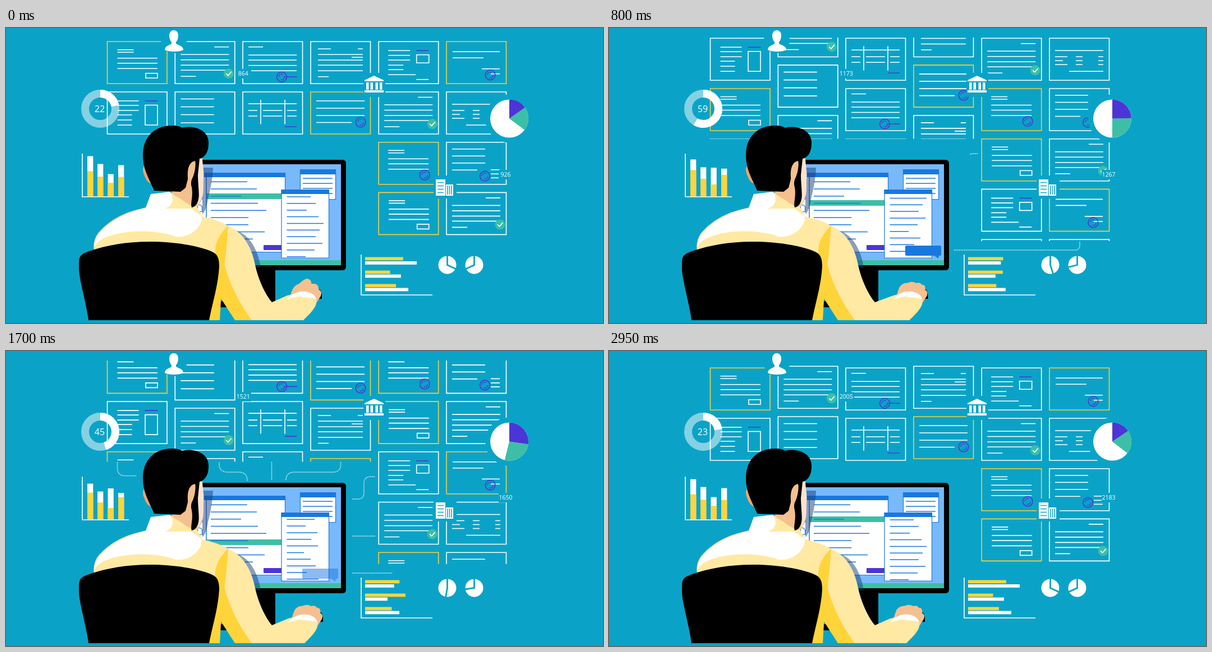
An HTML page that plays this animation: 1064x526 px, repeating every 3000 ms.

```html
<!DOCTYPE html>
<html lang="en">
<head>
<meta charset="utf-8">
<title>Document processing</title>
<style>
  html, body { margin: 0; width: 100%; height: 100%; overflow: hidden; background: #0aa3c7; }
  svg { display: block; width: 100vw; height: 100vh; }
  text { font-family: "Open Sans", "Noto Sans", sans-serif; fill: #fff; text-anchor: middle; }
  .bg { fill: #0aa3c7; }
  .w { fill: #fff; }
  .y { fill: #ffd43b; }
  .card { fill: none; stroke: #fff; stroke-width: 1.6; }
  .gold { stroke: #f5cf3f; }
  .violet { stroke: #4c35d6; }
  .axis { fill: none; stroke: #fff; stroke-width: 1.6; }
  .route { fill: none; stroke: #fff; stroke-width: 1.5; }
  .blue { fill: #1878e0; }
  .ink { fill: none; stroke: #1878e0; stroke-width: 1.5; }
  .pane { fill: #fff; stroke: #1878e0; stroke-width: 1.2; }
  .teal { fill: #3cbfa6; }
  .skin { fill: #f5c08f; }
  .pale { fill: #ffe9a3; }
  .shade { fill: #173f7a; opacity: .5; }
</style>
</head>
<body>
<svg viewBox="0 0 1064 526">
  <defs>
    <clipPath id="clipShort"><rect x="170" y="17" width="490" height="180.5"/></clipPath>
    <clipPath id="clipTall"><rect x="655" y="17" width="250" height="363"/></clipPath>
    <clipPath id="clipList"><rect x="491" y="296" width="85" height="113"/></clipPath>
  </defs>

  <g id="cards"></g>

  <!-- icons and counters over the cards -->
  <circle class="bg" cx="299" cy="22" r="23"/>
  <path class="w" d="M299 4c5 0 8 4 8 9 0 6-2 10-4 12v3c5 3 13 4 13 11-6 4-27 4-33 0 0-7 8-8 12-11v-3c-2-2-4-6-4-12 0-5 3-9 8-9z"/>
  <g>
    <rect class="bg" x="637" y="80" width="39" height="43"/>
    <path class="w" d="M639 95v-2l17-8 17 8v2zM642 97h4.500v13h-4.500zM649.500 97h4.500v13h-4.500zM658.500 97h4.500v13h-4.500zM666 97h4.500v13h-4.500zM639 111h34v4h-34z"/>
  </g>
  <g>
    <rect class="bg" x="762" y="263" width="41" height="41"/>
    <path class="w" d="M766 270h17v29h-17zM784 279h13v20h-13z"/>
    <path d="M769 275.500h11M769 281.500h11M769 287.500h11M769 293.500h11M787 281v16M790.500 281v16M794 281v16" stroke="#0aa3c7" stroke-width="1.500"/>
  </g>
  <rect class="bg" x="410" y="73" width="27" height="17"/>
  <text id="countA" x="422.800" y="85" font-size="10.600"></text>
  <rect class="bg" x="878" y="253" width="25" height="17"/>
  <text id="countB" x="890.500" y="265" font-size="10.600"></text>

  <!-- charts -->
  <circle cx="168" cy="144" r="27" fill="none" stroke="#fff" stroke-opacity=".5" stroke-width="14"/>
  <circle id="ring" cx="168" cy="144" r="27" fill="none" stroke="#fff" stroke-width="14" pathLength="100" transform="rotate(-90 168 144)"/>
  <text id="percent" x="167" y="150" font-size="16"></text>
  <circle class="bg" cx="897" cy="161.500" r="43"/>
  <circle class="w" cx="897" cy="161.500" r="34"/>
  <path id="pieTeal" class="teal"/>
  <path id="pieViolet" fill="#4c35d6"/>
  <path class="axis" d="M136 224V301H219M633 404V476H760"/>
  <g id="bars"></g>
  <circle class="w" cx="786.500" cy="422.500" r="16"/>
  <circle class="w" cx="834.500" cy="422.500" r="16"/>
  <path id="cuts" fill="none" stroke="#0aa3c7" stroke-width="2.800"/>
  <g id="routes"></g>

  <!-- monitor -->
  <path d="M440 425h40v62h28v11H378v-11h62z"/>
  <rect x="300" y="235" width="306" height="197" rx="6"/>
  <path fill="#78b9fb" d="M310 243H597V423H310z"/>
  <path class="teal" d="M310 414H597V423H310z"/>
  <path class="pane" d="M524.500 252.500H587.500V305.500H524.500z"/>
  <path class="blue" d="M524 252H588V261H524z"/>
  <path class="ink" d="M529 268H582M529 277H582M529 286H582M529 295H582"/>
  <path class="pane" d="M336 259H497.500V399.500H336z"/>
  <path class="blue" d="M336 258H498V266H336z"/>
  <rect id="highlight" class="teal" x="357" width="141" height="10"/>
  <path class="ink" d="M357 266V399" stroke-width="1.200"/>
  <path id="textLines" class="ink"/>
  <rect x="459" y="387" width="40" height="9" rx="1" fill="#4c35d6"/>
  <path class="pane" d="M341.500 273h5l3 3v9h-8zM341.500 293h5l3 3v9h-8zM341.500 315.500h5l3 3v9h-8z"/>
  <path class="pane" d="M491 289H575.500V410H491z"/>
  <g clip-path="url(#clipList)"><path id="list" class="ink"/></g>
  <path class="blue" d="M490.500 288H576V296H490.500z"/>
  <path id="bubble" class="blue" d="M530 388H590q2 0 2 2V404q0 2-2 2H588L587 411 580 406H530q-2 0-2-2V390q0-2 2-2z"/>
  <path class="shade" d="M350 249H369C368 268 365 285 360 305 358 318 356 326 350 332z"/>
  <path class="shade" d="M400 359C430 362 448 390 454 427H441C430 395 420 380 400 359z"/>

  <!-- man -->
  <path id="mouse"/>
  <path id="handUp" class="skin" d="M505 480C510 470 510 463 518 458 526 455 528 449 536 447 542 447 545 452 544 456 549 456 553 455 556 460 557 463 557 465 558 467 562 468 563 473 561 478L554 489 530 492z"/>
  <path id="handFlat" class="skin" d="M505 480C511 470 510 462 516 458 522 453 527 456 531 453 537 452 540 454 542 455 547 453 551 455 552 458 557 457 559 462 558 467 562 469 563 473 561 478L554 489 530 492z"/>
  <path class="y" d="M340 340 396 353 420 440 440 521H408L381 479 381 521H358z"/>
  <path id="arm" class="pale"/>
  <path id="cuff" class="w"/>
  <path class="pale" d="M158 400C154 388 158 374 164 366 190 335 225 325 250 320L293 293 330 303 350 336C372 341 388 347 396 353 375 372 366 395 379 428L360 470H180z"/>
  <path class="y" d="M396 353C376 371 365 398 379 430L362 521H381L384 470 392 400z"/>
  <path class="w" d="M157 391C156 374 180 338 248 321L283 322 326 319C342 322 350 330 349 340 346 359 325 375 302 372 275 361 215 357 176 374 167 378 161 384 157 391z"/>
  <path class="skin" d="M290 280 330 240 346 231C351 245 352 260 352 272 352 285 351 300 348 308L339 322 300 300z"/>
  <path fill="#fbe3cf" d="M343 234 350 232C350 245 354 258 352 270 351 285 353 295 349 303L341 317 344 300C341 285 341 262 343 234z"/>
  <path class="pale" d="M291 293 296 297C305 300 318 308 327 318L340 318 350 336 330 322 280 322z"/>
  <path class="w" d="M258 296 292 292C301 305 297 318 283 322L248 323z"/>
  <path fill="#efa36b" d="M250 245C242 245 243 256 247 264 250 272 255 279 263 277z"/>
  <path d="M264 290C256 270 243 252 244 224 245 193 266 173 298 174 305 174 311 176 314 178 334 173 362 181 361 206 361 222 354 231 345 233L342 262C342 278 345 296 343 305 341 314 337 319 331 320 328 313 334 300 331 284L326 262 320 285 311 292z"/>
  <path class="skin" d="M337 237C329 238 325 246 324 256 323 266 326 280 324 290L311 292 326 305 331 303C332 292 328 280 331 270 336 262 339 244 337 237z"/>
  <path d="M130 420C130 406 134 403 148 398 180 387 215 381 258 381 300 381 340 388 363 397 376 402 380 408 380 425 378 460 368 490 362 521H147C143 490 132 455 130 432z"/>
</svg>

<script>
const LOOP = 3000, PITCH = 89.7;
const $ = id => document.getElementById(id);
const set = (id, attrs) => { for (const k in attrs) $(id).setAttribute(k, attrs[k]); };
const clamp = x => Math.max(0, Math.min(1, x));
const span = (t, a, b) => clamp((t - a) / (b - a));

// ---- cards ----
const rows = (x1, x2, ...ys) => ys.map(y => `M${x1} ${y}H${x2}`).join('');
const ink = (d, cls = '') => `<path class="card ${cls}" d="${d}"/>`;
const frame = (cls, body) => ink('M0 0H106.500V75H0z', cls) + body;
const seal = (x, y) => `<g class="card violet"><circle cx="${x}" cy="${y}" r="8.800"/>
  <circle cx="${x}" cy="${y}" r="5.200" stroke-width="1.300" stroke-dasharray="10 6.300"/></g>`;

const button = frame('gold', ink(rows(18, 47, 14.5, 19) + rows(18, 89.5, 29.5, 38.5, 48) + 'M68.500 56.500H89.500V65H68.500z'));
const tallBox = frame('', ink(rows(18, 56, 16, 24, 33) + rows(18, 44, 41, 50, 59) + 'M67.500 23.500H89.500V59H67.500z')
  + ink(rows(67, 90, 16), 'violet'));
const checked = frame('', ink(rows(70, 96, 9.5) + rows(10, 96, 23, 32.5, 42, 51) + rows(10, 37, 62))
  + '<circle class="teal" cx="95.500" cy="57" r="9"/>' + ink('M91 57 94.500 60.500 100.500 53.500'));
const plain = frame('', ink(rows(10, 69.5, 12.5, 26.5, 40.5, 55)));
const signed = frame('', ink(rows(10, 36, 9.5) + rows(10, 96, 24, 33, 42.5, 52)) + seal(69.5, 63) + ink(rows(73, 97, 63), 'violet'));
const table = frame('', ink('M32 14V57.500M75 14V57.500' + rows(10, 96, 21) + [33, 43].map(y => rows(10, 26, y) + rows(36, 70, y) + rows(79, 96, y)).join(''))
  + ink(rows(75, 96, 62), 'violet'));
const letter = frame('', ink(rows(13, 36, 13) + rows(84, 93, 13) + rows(73, 93, 28) + rows(13, 93, 23, 33, 42, 52) + rows(13, 32, 62.5)));
const goldSeal = frame('gold', ink(rows(10, 96, 16, 29, 42) + rows(10, 73, 54.5)) + seal(89, 54));
const smallBox = frame('', ink(rows(17, 56, 16, 24.5, 33) + rows(17, 44, 42, 50) + rows(17, 66, 59) + rows(67, 89, 67.5) + 'M67.500 23.500H89.500V38H67.500z')
  + ink(rows(67, 89, 16), 'violet'));
const stamped = frame('gold', ink(rows(17, 46, 14.5, 19) + rows(17, 89, 29.5, 38.5, 48)) + seal(82, 58.5));
const sparse = frame('gold', ink(rows(11, 95, 18) + rows(11, 66, 29) + rows(63, 95, 48.5) + rows(79, 95, 57.5)) + seal(78, 59.5));
const columns3 = frame('', ink(rows(10, 96, 22) + [33, 40, 47].map(y => rows(10, y === 40 ? 24 : 32, y) + rows(47, 59, y) + rows(87, 96, y)).join('') + rows(35, 96, 59)));
const whiteSeal = frame('', ink(rows(10, 69, 12, 24.5, 37) + rows(10, 55, 49.5) + rows(79, 95, 49, 56.5, 63.5)) + seal(68.5, 60.5));

const columns = [
  { x: 180.5, steps: 4, deck: [button, tallBox] },
  { x: 301.3, steps: 2, deck: [checked, plain] },
  { x: 422, steps: 4, deck: [signed, table] },
  { x: 543, steps: 2, deck: [letter, goldSeal] },
  { x: 664.2, steps: 4, deck: [smallBox, checked, stamped, button], tall: true },
  { x: 785, steps: 4, deck: [sparse, columns3, whiteSeal, checked], tall: true },
];
$('cards').innerHTML = columns.map(({ x, deck, tall }, c) => {
  const stack = Array.from({ length: 9 }, (_, i) =>
    `<g transform="translate(${x} ${24.3 + i * PITCH})">${deck[i % deck.length]}</g>`).join('');
  return `<g clip-path="url(#clip${tall ? 'Tall' : 'Short'})"><g id="col${c}">${stack}</g></g>`;
}).join('');

// ---- dotted routes: path, then start and end of drawing and of erasing ----
const routes = [
  ['M839 381V387Q839 396 830 396H615', 250, 550, 1500, 1790],
  ['M657 224H650Q638 224 638 236V252Q638 264 627 264H615', 750, 1000, 1800, 2050],
  ['M617 330H659', 850, 1050, 1800, 2000],
  ['M198.500 198V208Q198.500 222.500 212 222.500H233', 800, 1050, 1800, 2050],
  ['M430 231Q430 216 414 216H396Q380 216 380 202V197', 900, 1190, 1800, 2130],
  ['M473.500 198V232', 1300, 1500, 2150, 2350],
  ['M596.500 198V203Q596.500 216 582 216H514Q499 216 499 231', 1300, 1600, 2150, 2450],
].map(([d, ...times]) => {
  const path = document.createElementNS('http://www.w3.org/2000/svg', 'path');
  path.setAttribute('class', 'route');
  path.setAttribute('d', d);
  $('routes').append(path);
  return { path, times, length: path.getTotalLength() };
});

// ---- chart bars: position, resting size, size at the peak ----
const uprights = [
  [145, 72, 64, 45, 48], [163, 58, 50, 35.5, 30.5], [181.5, 40, 55.5, 24.5, 20.5], [200, 56, 47.5, 35, 40],
];
const levels = [
  [408.5, 68, 60, 'y', 'early'], [416, 92, 44, 'w', 'early'], [432.5, 44.5, 72, 'y', 'late'],
  [439.5, 64, 40, 'w', 'late'], [456.5, 55, 47.5, 'y', 'late'], [463.5, 77, 61, 'w', 'late'],
];
const mix = (a, b, k) => a + (b - a) * k;
const rect = (cls, x, y, w, h) => `<rect class="${cls}" x="${x}" y="${y}" width="${w}" height="${h}"/>`;

// ---- eased tracks through shared key times ----
const TIMES = [0, 500, 1150, 1700, 2100, 2500, 2950, 3000];
function track(values, smooth = true) {
  const slope = i => {
    const a = Math.max(0, i - 1), b = Math.min(TIMES.length - 1, i + 1);
    return (values[b] - values[a]) / (TIMES[b] - TIMES[a]);
  };
  return t => {
    let i = 0;
    while (i < TIMES.length - 2 && t >= TIMES[i + 1]) i++;
    const d = TIMES[i + 1] - TIMES[i], u = (t - TIMES[i]) / d, a = values[i], b = values[i + 1];
    if (!smooth) return mix(a, b, u);
    const v = 1 - u;
    return a * (1 + 2 * u) * v * v + b * u * u * (3 - 2 * u) + d * u * v * (slope(i) * v - slope(i + 1) * u);
  };
}
const tracks = {
  donut: track([22, 49, 63, 45, 34, 28, 22.7, 22]),
  upright: track([0, .49, .95, 1, .77, .46, 0, 0]),
  early: track([0, .42, .95, .84, .57, .3, 0, 0]),
  late: track([0, .38, .88, 1, .68, .36, 0, 0]),
  violet: track([55, 76, 100, 98, 86.6, 71.5, 56, 55]),
  teal: track([126.5, 161, 197, 194, 180, 156, 127.5, 126.5]),
  highlight: track([295, 282, 336, 336, 328.5, 320.5, 295, 295], false),
  hand: track([0, 4.5, 6.5, 2, 0, 0, 0, 0], false),
};

const polar = (cx, cy, r, deg) => {
  const a = deg * Math.PI / 180;
  return `${cx + r * Math.sin(a)} ${cy - r * Math.cos(a)}`;
};
const slice = (from, to) =>
  `M897 161.500L${polar(897, 161.5, 34, from)}A34 34 0 ${to - from > 180 ? 1 : 0} 1 ${polar(897, 161.5, 34, to)}z`;
const cut = (cx, deg) => `M${cx} 405V422.500L${polar(cx, 422.5, 18, deg)}`;

set('textLines', { d: [430, 447, 419, 449, 464, 432, 432, 461, 440].map((x, i) => rows(365, x, 274.3 + i * 12.75)).join('') });
const lengths = [42, 51, 35, 56, 65, 58, 51, 63, 49, 33, 54, 43, 55, 30];
set('list', { d: Array.from({ length: 25 }, (_, i) => rows(500.5, 501 + lengths[i % 14], 301 + i * 11.85)).join('') });

function drawMan(t) {
  const s = tracks.hand(t), up = t < 200 || (t >= 1000 && t < 1350) || (t >= 1900 && t < 2300);
  const move = { transform: `translate(${s} 0)` };
  set('handUp', { ...move, display: up ? 'inline' : 'none' });
  set('handFlat', { ...move, display: up ? 'none' : 'inline' });
  set('mouse', { ...move, d: 'M545 466Q556 462 561 468L563 475V483H545z' });
  set('cuff', { ...move, d: 'M505 480C512 471 530 467 542 472 549 475 552 479 553 484 545 480 537 481 529 480 520 476 511 482 501 484z' });
  set('arm', { d: `M396 353C422 363 437 390 443 418 449 448 462 475 474 489L${501 + s} 477C${520 + s} 472 ${542 + s} 476 ${553 + s} 484`
    + `C${556 + s} 496 ${542 + s} 509 ${530 + s} 521H438C415 490 395 450 388 415 384 390 390 370 396 353z` });
}

function draw(t) {
  columns.forEach(({ steps }, c) => set('col' + c, { transform: `translate(0 ${-t / LOOP * steps * PITCH})` }));
  $('countA').textContent = Math.round(864 + .3867 * t);
  $('countB').textContent = Math.round(926 + .4261 * t);

  const share = tracks.donut(t), violet = tracks.violet(t), late = tracks.late(t), rise = tracks.upright(t);
  $('percent').textContent = Math.round(share);
  set('ring', { 'stroke-dasharray': `${share} 100` });
  set('pieViolet', { d: slice(0, violet) });
  set('pieTeal', { d: slice(violet, tracks.teal(t)) });
  set('cuts', { d: cut(786.5, 115 + 75 * late) + cut(834.5, 245 + 17 * late) });
  $('bars').innerHTML = uprights.map(([x, w0, w1, y0, y1]) => {
    const white = mix(w0, w1, rise), gold = mix(y0, y1, rise);
    return rect('w', x, 300.5 - white, 10.3, white) + rect('y', x, 300.5 - gold, 10.3, gold);
  }).join('') + levels.map(([y, a, b, cls, pace]) => rect(cls, 640, y, mix(a, b, tracks[pace](t)), 5.8)).join('');

  routes.forEach(({ path, length, times: [a, b, c, d] }) => {
    const from = length * span(t, c, d), to = length * span(t, a, b);
    const dots = Math.max(0, Math.round((to - from) / 3));
    path.setAttribute('stroke-dasharray', `0 ${from} ${'1.5 1.5 '.repeat(dots)}0 999`);
    path.setAttribute('visibility', dots ? 'visible' : 'hidden');
  });

  set('highlight', { y: tracks.highlight(t) });
  set('list', { transform: `translate(0 ${-14 * 11.85 * clamp(t / 2950)})` });
  const grow = t < 500 ? 1.14 * span(t, 350, 500) : mix(1.14, 1, span(t, 500, 650));
  set('bubble', {
    transform: `translate(585 409) scale(${grow}) translate(-585 -409)`,
    opacity: 1 - span(t, 1600, 1800),
  });
  drawMan(t);
}

// The picture advances in steps of 50 ms.
const start = performance.now();
function tick() {
  const t = performance.now() - start;
  draw(Math.floor((t + 4) / 50) * 50 % LOOP);
  requestAnimationFrame(tick);
}
draw(0);
requestAnimationFrame(tick);
</script>
</body>
</html>
```
